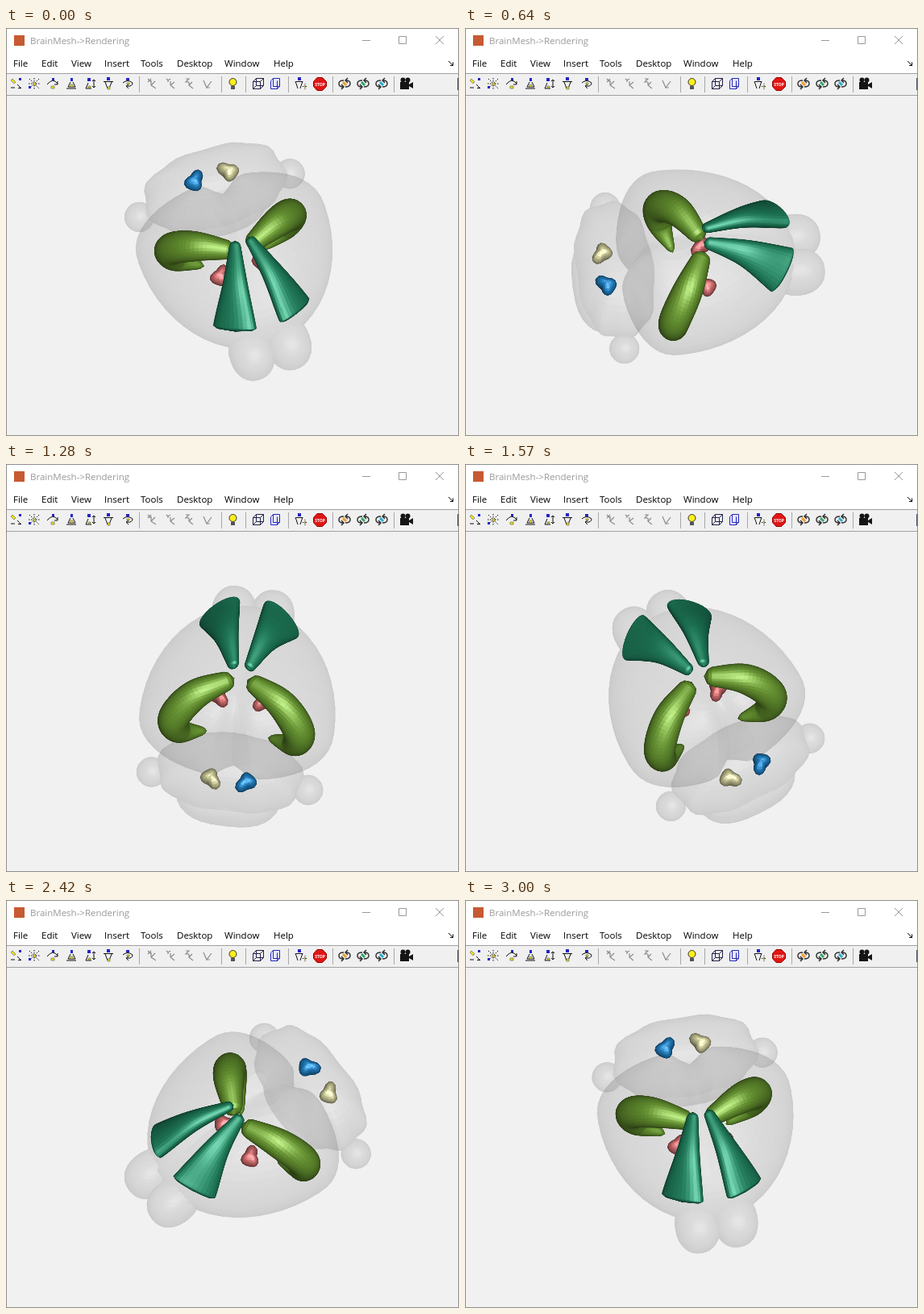
Recreate the animation shown at these times as an HTML page with a canvas. Size 562 px wide and 506 px high, loop 3.07 s.

```html
<!DOCTYPE html>
<html lang="en">
<head>
<meta charset="utf-8">
<title>Rendering</title>
<style>
html, body { margin: 0; width: 100%; height: 100%; overflow: hidden; background: #f1f1f1; }
canvas, svg { position: absolute; left: 0; top: 0; }
text { font: 11.5px "Open Sans", "Noto Sans", sans-serif; }
.line { fill: none; stroke: #111; }
.grey { fill: none; stroke: #8c8c8c; stroke-width: 1.2; }
.sep { stroke: #a8a8a8; }
.btn { fill: none; stroke: #999; }
.blue { fill: #2424c8; }
.gold { fill: #f2e313; stroke: #555; stroke-width: .6; }
</style>
</head>
<body>
<canvas id="scene" width="562" height="506"></canvas>
<svg width="562" height="506" viewBox="0 0 562 506">
  <rect width="562" height="56" fill="#fff"/>
  <rect y="57" width="562" height="26" fill="#f0f0f0"/>
  <path d="M0 56.5H562M0 83.5H562" stroke="#a0a0a0"/>
  <rect x=".5" y=".5" width="561" height="505" fill="none" stroke="#8e8e8e"/>
  <rect x="10" y="9" width="13" height="13" fill="#c65a32"/>
  <text x="30" y="20" fill="#999">BrainMesh-&gt;Rendering</text>
  <path class="btn" d="M442 15.5h10M487.500 10.500h9v9h-9zM533 10l10 10M543 10l-10 10"/>
  <g id="menu"></g>
  <path class="line" d="M549 41l5 5M551 46.500h4M554.500 42.500v4"/>
  <path class="sep" d="M165.500 60v20M267.500 60v20M297.500 60v20M350.500 60v20M405.500 60v20M481.500 60v20"/>
  <path d="M560.500 62v15" stroke="#446"/>

  <g transform="translate(12 69)">
    <path class="gold" d="M-6-4l2-2 4 4-2 2z"/><path class="line" d="M-6 5h5M2 1l4 4M3 5.500h4"/>
    <path class="blue" d="M4-7h3v3h-3z"/>
  </g>
  <g transform="translate(35 69)">
    <path class="line" stroke-dasharray="1.500 1.500" d="M-6-6l12 12M6-6l-12 12M0-7v14M-7 0h14"/>
    <path class="gold" d="M-1-1h3v3h-3z"/><path class="blue" d="M-7 3h3v3h-3z"/>
  </g>
  <g transform="translate(58 69)">
    <path class="line" d="M-7 1q7-9 13-1M6-3v4h-4"/><path class="gold" d="M-2 3h4v3h-4z"/>
    <path class="blue" d="M-1-7h3v3h-3z"/>
  </g>
  <g transform="translate(81 69)">
    <path class="line" d="M-1-2l-3 6h9l-3-6M-6 6h12"/><path class="gold" d="M-1 1h3v3h-3z"/>
    <path class="blue" d="M-1-7h3v4h-3z"/>
  </g>
  <g transform="translate(104 69)">
    <path class="line" d="M-2-1l-3 7h7M5-5v10M3-3l2-2 2 2M3 3l2 2 2-2"/><path class="gold" d="M-2 3h3v2h-3z"/>
    <path class="blue" d="M-3-7h4v4h-4z"/>
  </g>
  <g transform="translate(127 69)">
    <path class="line" d="M-6-2.500h12M-4-2l3 8M4-2l-3 8"/><path class="gold" d="M-1 4h3v3h-3z"/>
    <path class="blue" d="M-2-8h4v4h-4z"/>
  </g>
  <g transform="translate(151 69)">
    <path class="line" d="M-6-1q6-5 12 0q0 5-7 4M1 1l-3 2 3 3"/><path class="gold" d="M-1-1h3v2h-3z"/>
    <path class="blue" d="M-2-7h4v3h-4z"/>
  </g>

  <g class="grey">
    <path d="M176 63l4 4m0-4l-4 4M180 65v6l6 4M180 71l5-5"/>
    <path d="M199 63l2 2 3-2M201 65v2M204 66v5l5 4M204 71l5-4"/>
    <path d="M223 63h4l-4 4h4M227 67v4l5 4M227 71l4-4"/>
    <path d="M245 65l4 9 6-8M249 74h4"/>
  </g>

  <circle cx="281.500" cy="67" r="4.500" fill="#ffee1c" stroke="#333"/>
  <path d="M279 72h5v4h-5z" fill="#555"/>
  <path fill="none" stroke="#22224a" d="M306.500 66.500h9v9h-9zM306.500 66.500l4-4h9v9l-4 4M315.500 66.500l4-4M310.500 62.500v9h9M306.500 75.500l4-4"/>
  <path d="M328.500 65.500l3-3h8v10l-3 3h-8z" fill="#e6e9ff" stroke="#2828bb"/>
  <path d="M331.500 62.500v10h8M336.500 65.500v10" fill="none" stroke="#2828bb"/>
  <g transform="translate(366 69)">
    <path class="blue" d="M-4-8h4v4h-4z"/><path class="line" d="M-7-3l3 9M2-3l-3 9M-6-2.500h8"/>
    <path class="line" stroke-dasharray="1 1" d="M2 3.500h6M5 0v7"/><circle class="gold" cx="5" cy="3.500" r="1"/>
  </g>
  <path d="M386 61.500h6.500l5 5v6l-5 5h-6.500l-4.500-5v-6z" fill="#e01616" stroke="#900"/>
  <text x="389.500" y="71.500" text-anchor="middle" fill="#fff" style="font-size:5px;font-weight:700">STOP</text>
  <g id="spins"></g>
  <g fill="#151515">
    <circle cx="492.500" cy="64.500" r="3"/><circle cx="498.500" cy="64.500" r="3"/>
    <path d="M489 67h11v9h-11zM500 70l5-3v8l-5-3z"/>
  </g>
</svg>
<script>
const scene = document.getElementById('scene');
const ctx = scene.getContext('2d');
const layer = document.createElement('canvas');
layer.width = 562;
layer.height = 506;
const layerCtx = layer.getContext('2d');

const menu = { File: 9, Edit: 44, View: 81, Insert: 122, Tools: 167, Desktop: 212, Window: 271, Help: 332 };
document.getElementById('menu').innerHTML = Object.entries(menu)
  .map(([name, x]) => `<text x="${x}" y="48">${name}</text>`).join('');
document.getElementById('spins').innerHTML = [[420, '#f09a28'], [443, '#2fa866'], [466, '#28a8d0']]
  .map(([x, color]) => `<g transform="translate(${x} 69)" fill="none">
    <path stroke="#333" stroke-width="1.500" d="M-1-4q-6 0-6 4t5 4M1 4q6 0 6-4t-5-4M-4 1l3 3-3 3M4-7l-3 3 3 3"/>
    <path stroke="${color}" stroke-width="3" d="M-2-2l4 4"/></g>`).join('');

// Vectors are [anterior, lateral, up].
const add = (p, q, k = 1) => p.map((x, i) => x + q[i] * k);
const dot = (p, q) => p[0] * q[0] + p[1] * q[1] + p[2] * q[2];
const cross = (p, q) => [p[1] * q[2] - p[2] * q[1], p[2] * q[0] - p[0] * q[2], p[0] * q[1] - p[1] * q[0]];
const unit = p => { const n = Math.hypot(...p) || 1; return p.map(x => x / n); };

function mesh(rows, cols, point, color) {
  const grid = [];
  for (let i = 0; i <= rows; i++) {
    grid.push(Array.from({ length: cols + 1 }, (_, j) => point(i / rows, j / cols)));
  }
  const faces = [];
  for (let i = 0; i < rows; i++) for (let j = 0; j < cols; j++) {
    faces.push({ quad: [grid[i][j], grid[i + 1][j], grid[i + 1][j + 1], grid[i][j + 1]], color });
  }
  return faces;
}

function ball(rows, cols, shape, color) {
  return mesh(rows, cols, (s, t) => {
    const lat = s * Math.PI, lon = t * 2 * Math.PI;
    return shape(Math.cos(lon) * Math.sin(lat), Math.sin(lon) * Math.sin(lat), Math.cos(lat), lon);
  }, color);
}

// A power below 1 makes a round profile boxier.
const boxy = (x, power) => Math.sign(x) * Math.abs(x) ** power;

const ellipsoid = (c, r, power = 1) => ball(20, 32, (...dir) =>
  c.map((x, i) => x + r[i] * boxy(dir[i], power)));

const lump = (c, r, side, color) => ball(12, 20, (x, y, z, lon) => {
  const k = r * (1 + (.2 * Math.cos(3 * lon + 1) + .2 * Math.sin(2 * lon)) * (1 - z * z));
  return [c[0] + x * k, side * (c[1] + y * k), c[2] + z * k];
}, color);

// Smooth path through [a, l, z, width, thickness] knots.
function along(knots, s) {
  const last = knots.length - 1;
  const x = Math.max(0, Math.min(last, s * last));
  const i = Math.min(last - 1, Math.floor(x)), f = x - i;
  const p = knots[i], q = knots[i + 1];
  const before = knots[i - 1] || add(add(p, p), q, -1);
  const after = knots[i + 2] || add(add(q, q), p, -1);
  return p.map((v, k) => v + .5 * f * (q[k] - before[k]
    + f * (2 * before[k] - 5 * v + 4 * q[k] - after[k]
    + f * (3 * (v - q[k]) + after[k] - before[k]))));
}

function tube(knots, across, side, color) {
  return mesh(46, 28, (s, t) => {
    const [a, l, z, width, thick] = along(knots, s);
    const dir = unit(add(along(knots, s + .01), along(knots, s - .01), -1).slice(0, 3));
    const e1 = unit(add(across, dir, -dot(across, dir))), e2 = cross(dir, e1);
    const cap = Math.max(0, 1 - s / .05, 1 - (1 - s) / .05);
    const k = Math.sqrt(Math.max(0, 1 - cap * cap)), w = t * 2 * Math.PI;
    const p = add(add([a, l, z], e1, width * k * Math.cos(w)), e2, thick * k * Math.sin(w));
    return [p[0], side * p[1], p[2]];
  }, color);
}

const both = make => [...make(1), ...make(-1)];

const cerebrum = ball(32, 56, (x, y, z) => {
  const l = 121 * y, groove = Math.exp(-((l / 16) ** 2));
  return [
    -36 + (x > 0 ? 155 * x : 66 * boxy(x, .8) * (1 - .35 * groove)),
    l,
    -16 + 80 * z * (z > 0 ? 1 - .12 * groove : 1)
  ];
});
const shells = [
  [
    ...ball(24, 48, (x, y, z, lon) => {
      const k = 1 + .03 * Math.cos(9 * lon) * (1 - z * z);
      return [-106 + 47 * boxy(x, .8) * k, 89 * boxy(y, .85) * k, -20 + 52 * z];
    }),
    ...ellipsoid([-109, 0, -52], [49, 66, 34], .75),
    ...both(side => ellipsoid([-106, 98 * side, -42], [18, 18, 18]))
  ],
  [...cerebrum, ...both(side => ellipsoid([120, 24 * side, -33], [33, 27, 30], .9))]
];

const hippocampus = [[4, 9, 22, 10, 10], [-20, 53, 15, 18, 18], [-40, 78, -16, 19, 19],
  [-41, 71, -50, 15, 15], [-29, 39, -67, 3, 3]];
const wedge = [[5, 9, 50, 6, 5], [56, 25, 37, 17, 11], [102, 40, 6, 31, 13]];
const solids = [
  ...both(side => tube(hippocampus, [1, 0, 0], side, [108, 156, 52])),
  ...both(side => tube(wedge, [.05, -.76, .65], side, [34, 132, 96])),
  ...both(side => lump([5, 28, -36], 11, side, [203, 106, 108])),
  ...lump([-119, 22, -14], 11, 1, [34, 126, 190]),
  ...lump([-119, 22, -14], 11, -1, [200, 198, 150])
];

const light = unit([.1, -.06, 1]);

function solidColor(color, lit) {
  return color.map(c => c * (.4 + .6 * lit) + 85 * lit ** 14);
}

function shellColor(_, lit) {
  const g = 118 + 58 * lit + 32 * lit ** 24;
  return [g, g, g + 1];
}

function paint(target, faces, angle, tint) {
  const cos = Math.cos(angle), sin = Math.sin(angle);
  const project = ([a, l, z]) => {
    const near = a * sin + l * cos;
    return [291 + a * cos - l * sin, 280 + near * .9 - z * .44, near * .44 + z * .9];
  };
  const drawn = faces.map(({ quad, color }) => {
    const pts = quad.map(project);
    let n = unit(cross(add(pts[2], pts[0], -1), add(pts[3], pts[1], -1)));
    if (n[2] < 0) n = n.map(x => -x);
    return { pts, color, lit: Math.max(0, dot(n, light)), depth: pts.reduce((sum, p) => sum + p[2], 0) };
  }).sort((p, q) => p.depth - q.depth);
  target.lineWidth = .8;
  for (const { pts, color, lit } of drawn) {
    target.fillStyle = target.strokeStyle = `rgb(${tint(color, lit).map(Math.round)})`;
    target.beginPath();
    pts.forEach(p => target.lineTo(p[0], p[1]));
    target.closePath();
    target.fill();
    target.stroke();
  }
}

// Uneven turning speed: [step, degrees].
const turns = [[0, 72.3], [9, -7], [14, -47], [22, -118.500], [29, -168], [34, -215.500], [42, -280], [43, -287.700]];

function angleAt(step) {
  const i = turns.findIndex(turn => turn[0] > step);
  const [s0, d0] = turns[i - 1], [s1, d1] = turns[i];
  return (d0 + (d1 - d0) * (step - s0) / (s1 - s0)) * Math.PI / 180;
}

function draw(step) {
  const angle = angleAt(step);
  ctx.fillStyle = '#f1f1f1';
  ctx.fillRect(0, 0, 562, 506);
  for (const shell of shells) {
    layerCtx.clearRect(0, 0, 562, 506);
    paint(layerCtx, shell, angle, shellColor);
    ctx.globalAlpha = .32;
    ctx.drawImage(layer, 0, 0);
    ctx.globalAlpha = 1;
  }
  paint(ctx, solids, angle, solidColor);
}

let shown = -1;
const start = performance.now();

function tick() {
  const t = (performance.now() - start) % 3070;
  // 14 steps a second, each starting on a 10 ms tick
  const step = Math.max(0, Math.min(42, Math.ceil((Math.floor(t / 10) + 1) * .14 - 1e-6) - 1));
  if (step !== shown) draw(shown = step);
  requestAnimationFrame(tick);
}
tick();
</script>
</body>
</html>
```
